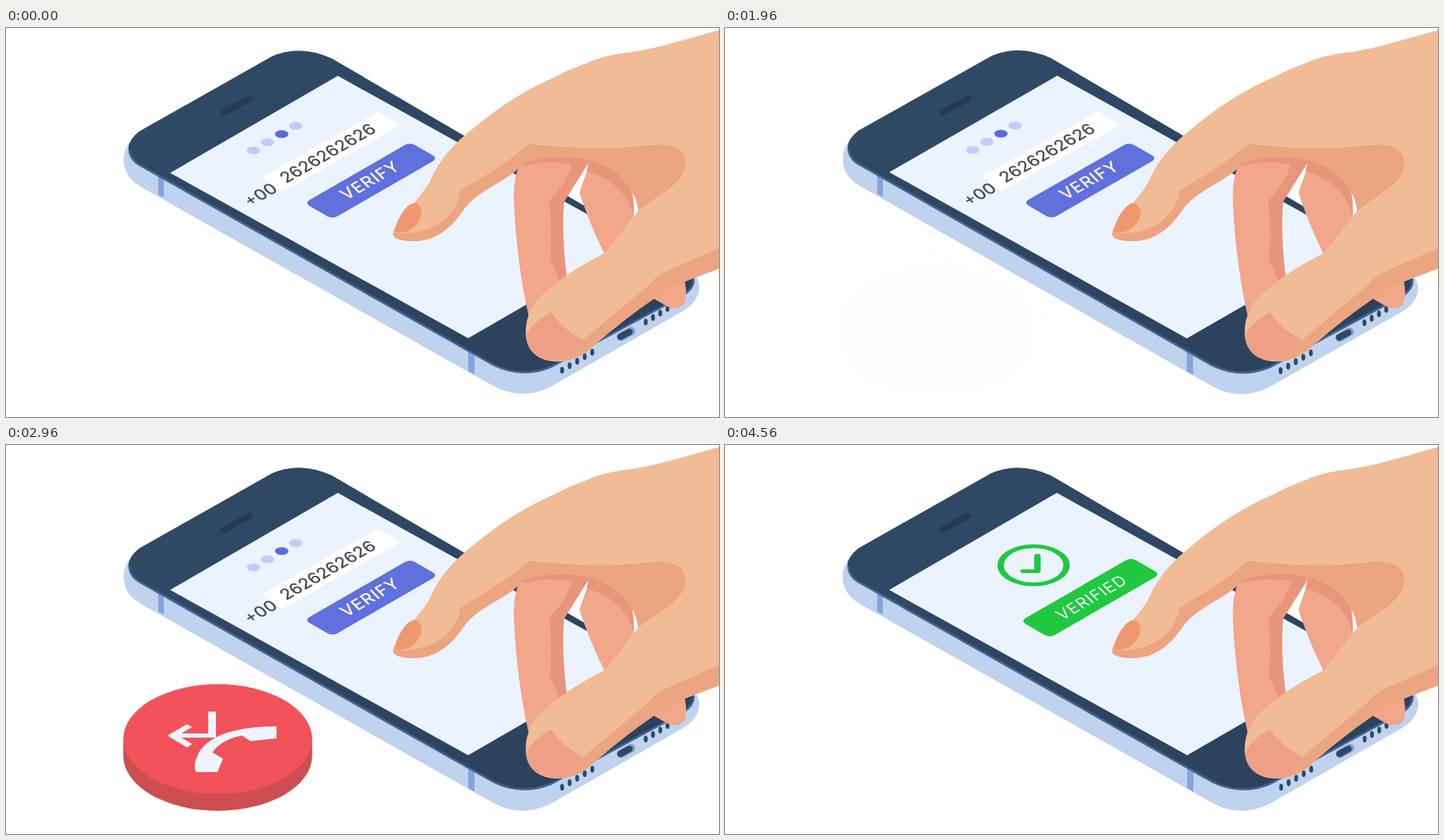
Recreate the animation shown at these times as an HTML page. Size 1012x553 px, loop 4800 ms.

```html
<!DOCTYPE html>
<html lang="en">
<head>
<meta charset="utf-8">
<title>Verify by call</title>
<style>
html, body { margin: 0; width: 100%; height: 100%; overflow: hidden; background: #fff; }
svg { display: block; width: 100%; height: 100%; }
text { font-family: Inter, Roboto, sans-serif; text-anchor: middle; }
.dark { fill: #2f4863; }
.skin { fill: #f1bb95; }
.shade { fill: #eba581; }
.pink { fill: #f2a68a; }
.deep { fill: #e8957a; }
#waves { fill: none; stroke: #e8e8e8; stroke-width: 1.2; }
</style>
</head>
<body>
<svg viewBox="0 0 1012 553">
  <defs>
    <linearGradient id="glass" x1="0" y1="0" x2="1" y2="1">
      <stop offset="0" stop-color="#304a66"/>
      <stop offset="1" stop-color="#2b405b"/>
    </linearGradient>
  </defs>
  <g id="waves"></g>

  <g id="phone">
    <path fill="#bfd3ef" d="M190 150Q167 164 167 187Q167 211 190 225L692 509Q733 531 775 509L958 404Q984 390 984 368Q984 354 970 345Z"/>
    <path fill="#86a3de" d="M216 209l8 5v27l-8 -4zM656 460l9 5v28l-9 -5z"/>
    <path fill="url(#glass)" d="M189 147L378 40Q418 23 462 43L960 334Q992 358 963 379L775 481Q733 500 692 479L190 195Q158 172 189 147Z"/>
    <path fill="none" stroke="#41658f" stroke-width="3" d="M175 173Q176 187 190 195L692 479Q733 499 775 481L963 379Q977 369 976 357"/>
    <path fill="#ebf3ff" d="M233 206L471 68L894 303L656 441Z"/>
    <path stroke="#263a55" stroke-width="9" stroke-linecap="round" d="M308 121L345 101"/>
    <g id="holes" class="dark"></g>
    <g stroke-linecap="round">
      <path stroke="#7f9dcb" stroke-width="12" d="M873 439L887 431"/>
      <path stroke="#2f4863" stroke-width="9" d="M872 439L885 432"/>
    </g>
    <g id="form">
      <g id="dots"></g>
      <path fill="#fff" d="M364 212L528 119L560 138L392 233Z"/>
      <g fill="#4c4c50" font-size="24" font-weight="500">
        <text transform="matrix(.866 -.5 .7 .71 367 243)">+00</text>
        <text transform="matrix(.866 -.5 .7 .71 462.5 184)">2626262626</text>
      </g>
      <rect transform="matrix(.866 -.5 .866 .5 518.3 217)" x="-86.5" y="-23" width="173" height="46" rx="8" fill="#6070dc"/>
      <text transform="matrix(.866 -.5 .7 .71 522.5 222.5)" fill="#fff" font-size="24" font-weight="500" letter-spacing="1">VERIFY</text>
    </g>
    <g id="done">
      <rect transform="matrix(.866 -.5 .866 .5 518.5 217)" x="-90.5" y="-24" width="181" height="48" rx="8" fill="#20c840"/>
      <text transform="matrix(.866 -.5 .7 .71 526 222.5)" fill="#fff" font-size="23" letter-spacing="1">VERIFIED</text>
      <g id="tick" fill="none" stroke="#20c840" stroke-width="10" stroke-linecap="round" stroke-linejoin="round">
        <circle r="52"/>
        <path d="M-16 16H6V-26"/>
      </g>
    </g>
  </g>

  <g id="call">
    <path fill="#cd4e52" d="M166.500 418V442A134 78 0 0 0 434.500 442V418Z"/>
    <ellipse cx="300.500" cy="418" rx="134" ry="78" fill="#f2525a"/>
    <path fill="#f0f4fe" d="M287 379H298V416H249L264 425L257 430L229 413L257 397L264 401L249 410H287Z
      M384 400V417L347 421L335 413Q305 419 293 437L308 446L300 465H270Q264 455 275 435Q300 400 384 400Z"/>
  </g>

  <g id="hand">
    <path class="pink" d="M733 186Q719 210 721 250Q725 335 742 410L797 362Q788 300 792 247L829 188L790 178Z"/>
    <path class="deep" d="M733 196Q770 187 802 194Q800 215 771 246Q776 285 772 331Q779 338 786 365L797 362Q788 300 792 247L829 188Q780 176 733 190Z"/>
    <path class="pink" d="M830 190Q821 212 814 234Q828 278 850 322L891 268Q888 200 830 184Z"/>
    <path class="deep" d="M828 186Q876 203 889 234Q892 250 891 268Q880 220 824 204Z"/>
    <path class="pink" d="M918 384L963 358Q969 386 960 395Q948 403 932 392Z"/>
    <path class="skin" id="skin"/>
    <path class="shade" d="M742 164Q840 176 925 165Q965 166 965 193Q964 212 940 230L897 260Q896 246 889 234Q876 203 828 188Q770 177 730 195Z"/>
    <path class="shade" d="M1012 313L935 347Q922 353 912 366L820 443L783 474Q812 474 836 450Q880 412 918 386Q940 369 975 356L1012 342Z"/>
    <path fill="#ee9f87" d="M773 404Q740 425 738 440Q743 473 783 473Q806 467 818 443Q790 428 773 404Z"/>
    <path class="shade" id="under"/>
    <path fill="#f0976f" id="nail"/>
  </g>
</svg>
<script>
const $ = id => document.getElementById(id);
const LOOP = 4800;

// Index finger: [resting, pressing]
const outline = [
  "C724 94 688 121 645 158C618 184 610 200 602 217C592 238 564 262 550 288",
  "C725 98 680 118 632 141C600 158 592 172 578 182C560 194 515 200 504 224"];
const belly = [
  "C546 297 556 303 580 303C620 302 640 272 652 255C672 230 710 218 730 197L742 164",
  "C500 240 525 250 552 250C600 248 618 226 640 210C665 206 705 203 730 193L742 162"];
const crease = [
  "M742 165C720 185 690 205 645 231C642 262 610 297 551 291",
  "M742 162C710 175 665 195 630 202C606 232 575 246 504 227"];
const nail = [
  "M551 290C555 270 570 248 580 249C594 252 592 272 580 282C572 290 562 292 551 290Z",
  "M504 226C512 208 540 192 554 195C562 204 556 220 545 225C530 232 515 230 504 226Z"];
const wrist = "M1012 3L955 19Q920 29 890 34Q849 38 824 50Q794 61 779 70";
const thumb = "Q840 176 925 165Q965 166 965 193Q964 212 940 230L897 260L850 320" +
  "Q790 350 755 385Q735 410 738 440Q745 475 785 474Q812 474 836 450Q880 412 918 386Q940 369 975 356L1012 342Z";

const mix = ([a, b], p) => {
  const to = b.match(/\d+/g);
  let i = 0;
  return a.replace(/\d+/g, n => (+n + (to[i++] - n) * p).toFixed(2));
};
const ramp = (t, start, length) => {
  const p = Math.min(1, Math.max(0, (t - start) / length));
  return (1 - Math.cos(Math.PI * p)) / 2;
};
const ellipse = (x, y, rx, ry, fill = "") =>
  `<ellipse cx="${x}" cy="${y}" rx="${rx}" ry="${ry}" ${fill && `fill="${fill}"`}/>`;

for (let i = 0; i < 4; i++)
  $("dots").innerHTML += ellipse(351.3 + i * 20, 174 - i * 11.6, 9.5, 5.6, i == 2 ? "#5a6bdb" : "#c3cbfb");
for (let i = 0; i < 5; i++) $("holes").innerHTML += ellipse(789.3 + i * 10.7, 486.5 - i * 6.4, 2.8, 4.8);
for (let i = 0; i < 4; i++) $("holes").innerHTML += ellipse(908 + i * 10.3, 418 - i * 6.4, 2.8, 4.8);

const wave = (x, y, n) => `M${x} ${y}q3 9 14 8${"t14 8".repeat(n)}`;
for (let i = 0; i < 3; i++)
  $("waves").innerHTML += `<path d="${wave(510 + i * 68, 54 - i * 17, 11 - i * 2)}${wave(205 - i * 46, 268 + i * 23, 30 - i * 2)}"/>`;
const waves = [...$("waves").children];

function draw(t) {
  const press = 1.04 * (ramp(t, 0, 1000) - ramp(t, 1160, 400));
  const under = mix(belly, press);
  $("skin").setAttribute("d", wrist + mix(outline, press) + under + thumb);
  $("under").setAttribute("d", mix(crease, press) + under + "Z");
  $("nail").setAttribute("d", mix(nail, press));

  const ringing = t > 1920 && t < 2880;
  const tilt = ringing ? .2 * Math.sin((t - 1920) / 240 * 2 * Math.PI) : 0;
  $("phone").setAttribute("transform", `rotate(${tilt} 575 275)`);
  waves.forEach((w, i) => {
    w.style.opacity = .55 * (ramp(t, 1880 + i * 200, 240) - ramp(t, 2560 + i * 60, 260));
  });

  $("call").style.opacity = ramp(t, 1940, 370) - ramp(t, 3060, 420);
  const done = ramp(t, 3060, 400);
  $("form").style.opacity = 1 - done;
  $("done").style.opacity = done;
  const size = .9 + .1 * (ramp(t, 3200, 440) - ramp(t, 3640, 920));
  $("tick").setAttribute("transform", `translate(438 171) scale(${size} ${size * .58})`);
}

function frame(now) {
  draw(now % LOOP);
  requestAnimationFrame(frame);
}
draw(0);
requestAnimationFrame(frame);
</script>
</body>
</html>
```
